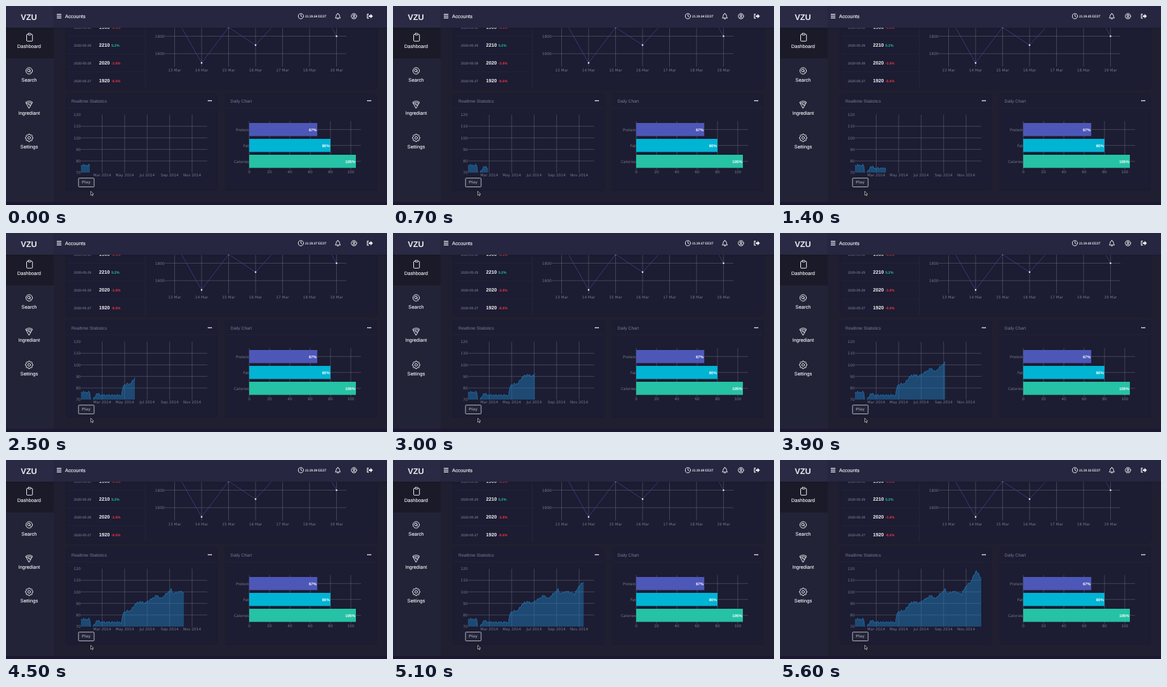
An HTML page that plays this animation: 600x313 px, repeating every 5700 ms.

```html
<!DOCTYPE html>
<html lang="en">
<head>
<meta charset="utf-8">
<title>Accounts dashboard</title>
<style>
  html, body { margin: 0; width: 100%; height: 100%; overflow: hidden; background: #1f1f31; }
  svg { display: block; width: 100%; height: 100%; }
  text { font-family: "Liberation Sans", Arial, sans-serif; text-rendering: geometricPrecision; }
  .plot { font-family: "DejaVu Sans", Verdana, sans-serif; }
  .icon { fill: none; stroke: #f2f2f6; stroke-width: 1; stroke-linecap: round; stroke-linejoin: round; }
</style>
</head>
<body>
<svg id="stage" viewBox="0 0 600 313" xmlns="http://www.w3.org/2000/svg"></svg>
<script>
const LOOP = 5700, STEP = 100;
const BACK = '#1f1f31', RULE = '#29293d', GRID = '#626275', LABEL = '#77778b', WHITE = '#f6f6fa';
const MIDDLE = 'text-anchor="middle"', BOLD = 'font-weight="bold"';

const rect = (x, y, w, h, fill, extra = '') =>
  `<rect x="${x}" y="${y}" width="${w}" height="${h}" fill="${fill}" ${extra}/>`;
const line = (x1, y1, x2, y2, color = GRID, width = 0.6) =>
  `<path d="M${x1} ${y1}L${x2} ${y2}" stroke="${color}" stroke-width="${width}"/>`;
const text = (x, y, size, fill, str, extra = '') =>
  `<text x="${x}" y="${y}" font-size="${size}" fill="${fill}" ${extra}>${str}</text>`;
const plotText = (x, y, str, anchor = 'middle') =>
  text(x, y, 5.9, LABEL, str, `class="plot" text-anchor="${anchor}"`);
const dot = (x, y, r) => `<circle cx="${x}" cy="${y}" r="${r}" fill="${WHITE}"/>`;
const icon = (x, y, body) => `<g class="icon" transform="translate(${x} ${y})">${body}</g>`;
const each = (list, fn) => list.map(fn).join('');
const range = (count, fn) => Array.from({ length: count }, (_, i) => fn(i));

// Linear interpolation through [position, value] pairs.
function along(keys, p) {
  const i = Math.max(1, keys.findIndex(k => k[0] >= p));
  const [p0, v0] = keys[i - 1], [p1, v1] = keys[i];
  return v0 + (v1 - v0) * (p - p0) / (p1 - p0);
}

const card = (x, y, w, h) => rect(x, y, w, h, BACK, 'rx="1" filter="url(#cardShadow)"');

function titledCard(x, w, title) {
  const right = x + w;
  return card(x, 138, w, 151) + line(x, 160, right, 160, RULE) +
    text(x + 8, 151.6, 6.8, '#7c7c91', title) +
    range(3, i => dot(right - 13.3 + 2.3 * i, 149, 0.95)).join('');
}

function table() {
  const average = 2100;
  return each([1900, 2210, 2020, 1920], (value, i) => {
    const y = 35.8 + i * 28;
    const change = (value / average - 1) * 100;
    return text(107, y, 5.3, '#74748a', `2020-05-${30 - i}`, 'stroke="#74748a" stroke-width=".12"') +
      text(146.5, y + 0.6, 7.6, WHITE, value, BOLD) +
      text(166, y, 5.5, change < 0 ? '#e2383f' : '#1fc6a0', change.toFixed(1) + '%', BOLD) +
      (i < 3 ? line(97, y + 11.8, 219, y + 11.8, RULE) : '');
  }) + line(219.5, 34, 219.5, 129, RULE, 0.8);
}

function weekChart() {
  const px = i => 265.5 + 42.5 * i;
  const ys = [14.5, 89.5, 33.5, 61.5, 15, -29, 47.5];
  return each(ys, (_, i) => line(px(i), 34, px(i), 95.5) + plotText(px(i), 102.6, `${13 + i} Mar`)) +
    each([[1800, 47.5], [1600, 75]], ([v, y]) => line(250, y, 536, y) + plotText(249.7, y + 2.2, v, 'end')) +
    `<polyline points="${ys.map((y, i) => px(i) + ',' + y).join(' ')}" fill="none" stroke="#3f4590" stroke-width=".8"/>` +
    each(ys, (y, i) => dot(px(i), y, 1.25));
}

function barChart() {
  const px = v => 383 + 1.6 * v;
  const bars = [['Protein', 67, '#4d57b7'], ['Fat', 80, '#00b4d3'], ['Calories', 105, '#26c2a5']];
  return range(6, i => line(px(20 * i), 181, px(20 * i), 257.5) + plotText(px(20 * i), 263.3, 20 * i)).join('') +
    each(bars, ([name, v, color], i) => {
      const y = 194.3 + 25 * i;
      return line(383, y, 559, y) + plotText(382.6, y + 2.2, name, 'end') +
        rect(383, y - 10.3, px(v) - 383, 20.6, color) +
        text(px(v) - 1.1, y + 2.2, 6.1, '#fff', v + '%', 'text-anchor="end" ' + BOLD);
    });
}

// Turning points of the price: stage x, value.
const trend = [
  [118, 76.3], [132, 76.3], [133.5, 68.5], [136, 68.5], [143, 75.3], [150, 73.7], [182, 73.7], [185, 82.5],
  [197, 84], [204, 89.6], [211, 91.5], [219, 90.3], [238, 97], [244, 94], [260, 102], [263, 98.5],
  [274, 100.3], [286, 98], [294, 106], [300, 108], [309, 118.3], [317, 111.5]];
const wiggle = x => 0.7 * Math.cos(1.55 * (x - 118)) + 0.4 * Math.sin(0.83 * x);
const priceAt = x => along(trend, x) + wiggle(x);
const priceY = v => 262 - 1.82 * (v - 70);

function stockChart() {
  return each(['Mar', 'May', 'Jul', 'Sep', 'Nov'], (month, i) => {
    const x = 151.5 + 35.4 * i;
    return line(x, 171, x, 262) + plotText(x, 268.4, month + ' 2014');
  }) + range(6, i => {
    const v = 70 + 10 * i, y = priceY(v);
    return (v > 70 && v < 120 ? line(118, y, 317, y) : '') + plotText(117.8, y + 2.2, v, 'end');
  }).join('') + `<g clip-path="url(#plotArea)"><path id="area" fill="#1f77b4" fill-opacity=".5"/>
    <path id="trace" fill="none" stroke="#1f77b4" stroke-width=".85" stroke-linejoin="round"/></g>` +
    rect(114.2, 270.7, 24.6, 13.8, '#242437', 'rx="1" stroke="#b9b9c6" stroke-width="1"') +
    text(126.2, 279.4, 5.8, '#85859a', 'Play', `class="plot" ${MIDDLE} ${BOLD}`);
}

function sidebar() {
  const gear = range(24, i => {
    const r = i % 3 === 0 ? 4.5 : 6, a = (i - 1.5) * Math.PI / 12;
    return `${(r * Math.sin(a)).toFixed(2)},${(-r * Math.cos(a)).toFixed(2)}`;
  }).join(' ');
  const items = [
    ['Dashboard', `<rect x="-4" y="-4.8" width="9.2" height="10.8" rx="1"/>
      <rect x="-1.6" y="-6.2" width="4.4" height="2.6" rx=".6" fill="#1b1b28"/>`],
    ['Search', '<circle r="5.1"/><circle cx="-.5" cy="-.6" r="2.1"/><path d="M1 1L2.7 2.7"/>'],
    ['Ingrediant', `<path d="M-5.2-3.4Q0-6.8 5.2-3.4L0 6Z M-4.3-1.7Q0-4.2 4.3-1.7"/>
      <circle cx="-1" cy="-.2" r=".6"/><circle cx="1" cy="1" r=".5"/>`],
    ['Settings', `<polygon points="${gear}"/><circle r="2.1"/>`]];
  return rect(0, 34, 75, 274, '#232338') + rect(0, 34, 75, 48.5, '#1a1a28') +
    each(items, ([name, art], i) => icon(36.5, 49.3 + 52.7 * i, art) +
      text(36.4, 66 + 52.7 * i, 7.65, WHITE, name, MIDDLE + ` stroke="${WHITE}" stroke-width=".1"`));
}

function header() {
  const medium = `stroke="${WHITE}" stroke-width=".12"`;
  return rect(0, 0, 600, 34, '#26263f', 'filter="url(#headShadow)"') + rect(0, 0, 74.5, 34, '#2a2a44') +
    text(36, 22.3, 12.8, '#e8e8f0', 'VZU', `${MIDDLE} ${BOLD}`) +
    each([13.2, 16, 18.8], y => line(80, y, 87.2, y, WHITE, 1.3)) +
    text(93, 18.8, 7.8, WHITE, 'Accounts', medium) +
    icon(464.5, 16, '<circle r="4.1"/><path d="M0-2.4V0L1.7 1"/>') +
    text(471, 18, 4.95, WHITE, '', 'id="clock" ' + medium) +
    icon(522.6, 16, '<path d="M-3.8 2.6Q-2.6 1.4-2.6-.8Q-2.5-3.5 0-3.6Q2.5-3.5 2.6-.8Q2.6 1.4 3.8 2.6Z M0-3.7V-4.5 M-1 4.2H1"/>') +
    icon(548, 16, '<circle r="4.2"/><circle cy="-1" r="1.5"/><path d="M-2.7 3Q0 .2 2.7 3"/>') +
    `<g transform="translate(573 16)" fill="${WHITE}"><path d="M-1.8-1.3H1V-3.6L4.8 0L1 3.6V1.3H-1.8Z"/>
      <path d="M-1.6-3.2H-3.9V3.2H-1.6" fill="none" stroke="${WHITE}" stroke-width="1.2"/></g>`;
}

const shadow = (id, opacity) => `<filter id="${id}" x="-10%" y="-20%" width="120%" height="150%">
  <feDropShadow dx="0" dy=".5" stdDeviation="1.5" flood-color="#11111c" flood-opacity="${opacity}"/></filter>`;

document.getElementById('stage').innerHTML =
  `<defs>${shadow('cardShadow', 0.3)}${shadow('headShadow', 0.5)}
    <clipPath id="plotArea"><rect x="118" y="171" width="199" height="91"/></clipPath></defs>` +
  rect(0, 0, 600, 313, BACK) +
  card(95, 20, 489, 109.5) + table() + weekChart() +
  titledCard(95, 237, 'Realtime Statistics') + stockChart() +
  titledCard(345.5, 237.5, 'Daily Chart') + barChart() +
  sidebar() + header() + rect(0, 308, 600, 5, '#1c1832') +
  '<path d="M133.5 291.2V297.6L135 296.3L136 298.5L137 298L136.1 296H138Z" fill="#111" stroke="#eee" stroke-width=".6"/>';

const [area, trace, clock] = ['area', 'trace', 'clock'].map(id => document.getElementById(id));

// Time in ms and the right edge of the revealed data.
const reveal = [[0, 132], [1400, 167], [2500, 203], [3900, 260], [5600, 317]];

// The clock refreshes a little slower than once a second, so it skips one value.
function clockSecond(t) {
  const refreshes = Math.floor((t + 100) / 1100);
  return String(Math.floor(4.85 + 1.1 * refreshes)).padStart(2, '0');
}

function draw(time) {
  const t = Math.floor((time % LOOP) / STEP) * STEP;
  const edge = along(reveal, t);
  const xs = [...range(Math.ceil(edge - 118), i => 118 + i), edge];
  const d = 'M' + xs.map(x => `${x.toFixed(2)} ${priceY(priceAt(x)).toFixed(2)}`).join('L');
  trace.setAttribute('d', d);
  area.setAttribute('d', `${d}V262H118Z`);
  clock.textContent = `21.19.${clockSecond(t)} EEST`;
}

const start = performance.now();
function frame() {
  draw(performance.now() - start);
  requestAnimationFrame(frame);
}
frame();
</script>
</body>
</html>
```
